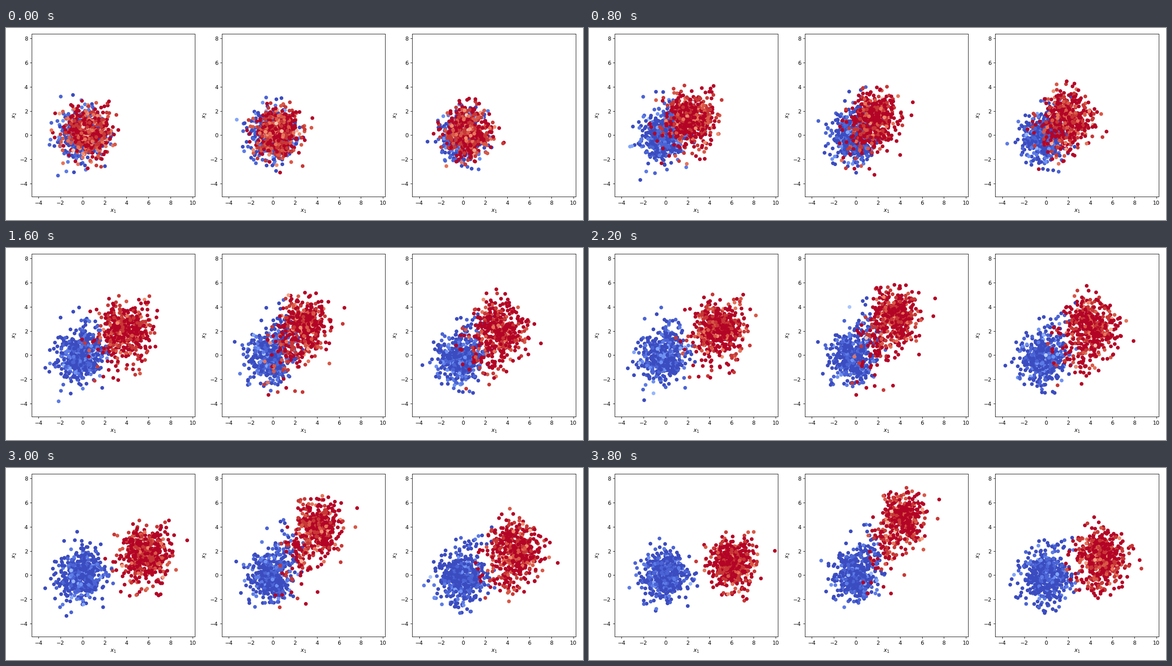
Write a matplotlib script that moves like this. It is 1280x427 px and loops after 4 s.

```python
import numpy as np
import matplotlib.pyplot as plt
from matplotlib.animation import FuncAnimation

W, H, DPI = 1280, 427, 256 / 3
FRAMES, INTERVAL = 20, 200
N = 500
BLUE, RED = 0, 1
TAIL_DIR = np.array([0.3, 0.95])


class Cloud:
    """One class of points, drifting as a whole while each point wanders."""

    def __init__(self, seed, cls, reach, lift, arch, split, swell):
        rng = np.random.default_rng(seed)
        self.seed, self.cls = seed, cls
        self.reach, self.lift, self.arch = reach, lift, arch
        self.split, self.swell = split, swell
        self.a, self.b = rng.normal(size=(2, N, 2))
        self.turn = rng.normal(0, 0.6, (N, 1))

    def center(self, t):
        bump = np.sin(np.pi * t)
        if self.cls == BLUE:
            return np.array([-0.25 * bump, -0.15 * bump])
        return np.array([0.45 + self.reach * np.sin(np.pi * t / 2),
                         0.25 + self.lift * t + self.arch * bump])

    def points(self, t):
        bump = np.sin(np.pi * t)
        z = self.a * np.cos(self.turn * t) + self.b * np.sin(self.turn * t)
        # The side facing the other class is drawn out towards it
        side = 1 if self.cls == BLUE else -1
        facing = np.maximum(0, side * z.sum(axis=1) / np.sqrt(2) - 0.6)
        tail = 0.6 * bump + (1 + self.cls) * self.split * t
        spread = 1 + self.swell * t + 0.12 * self.cls * bump
        return (self.center(t) + spread * z
                + side * tail * facing[:, None] * TAIL_DIR)

    def scores(self, frame):
        rng = np.random.default_rng([self.seed, frame])
        sure = 0.5 + 0.12 * min(1, frame / 5)
        doubt = np.minimum(0.055 * (rng.geometric(sure, N) - 1), 1)
        return np.abs(self.cls - doubt)


def make_panel(ax):
    ax.set(xlim=(-4.633, 10.204), ylim=(-5.07, 8.376),
           xlabel="$x_1$", ylabel="$x_2$",
           xticks=range(-4, 11, 2), yticks=range(-4, 9, 2))
    blank = np.zeros(2 * N)
    return ax.scatter(blank, blank, c=blank, cmap="coolwarm", vmin=0, vmax=1)


plt.rcParams["font.family"] = "DejaVu Sans"
fig, axes = plt.subplots(1, 3, figsize=(W / DPI, H / DPI), dpi=DPI,
                         facecolor="white")
dots = [make_panel(ax) for ax in axes]
fig.tight_layout()

# Each panel: how the red class travels, how the classes stretch and grow
motions = [dict(reach=5.6, lift=0.7, arch=1.5, split=0.0, swell=0.0),
           dict(reach=3.7, lift=4.4, arch=0.25, split=0.8, swell=-0.05),
           dict(reach=4.55, lift=1.1, arch=1.3, split=0.1, swell=0.12)]
clouds = [[Cloud(2 * i + cls + 3, cls, **motion) for cls in (BLUE, RED)]
          for i, motion in enumerate(motions)]


def update(frame):
    t = frame / (FRAMES - 1)
    for pair, dot in zip(clouds, dots):
        dot.set_offsets(np.vstack([c.points(t) for c in pair]))
        dot.set_array(np.concatenate([c.scores(frame) for c in pair]))
    return dots


anim = FuncAnimation(fig, update, frames=FRAMES, interval=INTERVAL,
                     init_func=lambda: update(0), repeat=True, repeat_delay=0)
plt.show()
```
